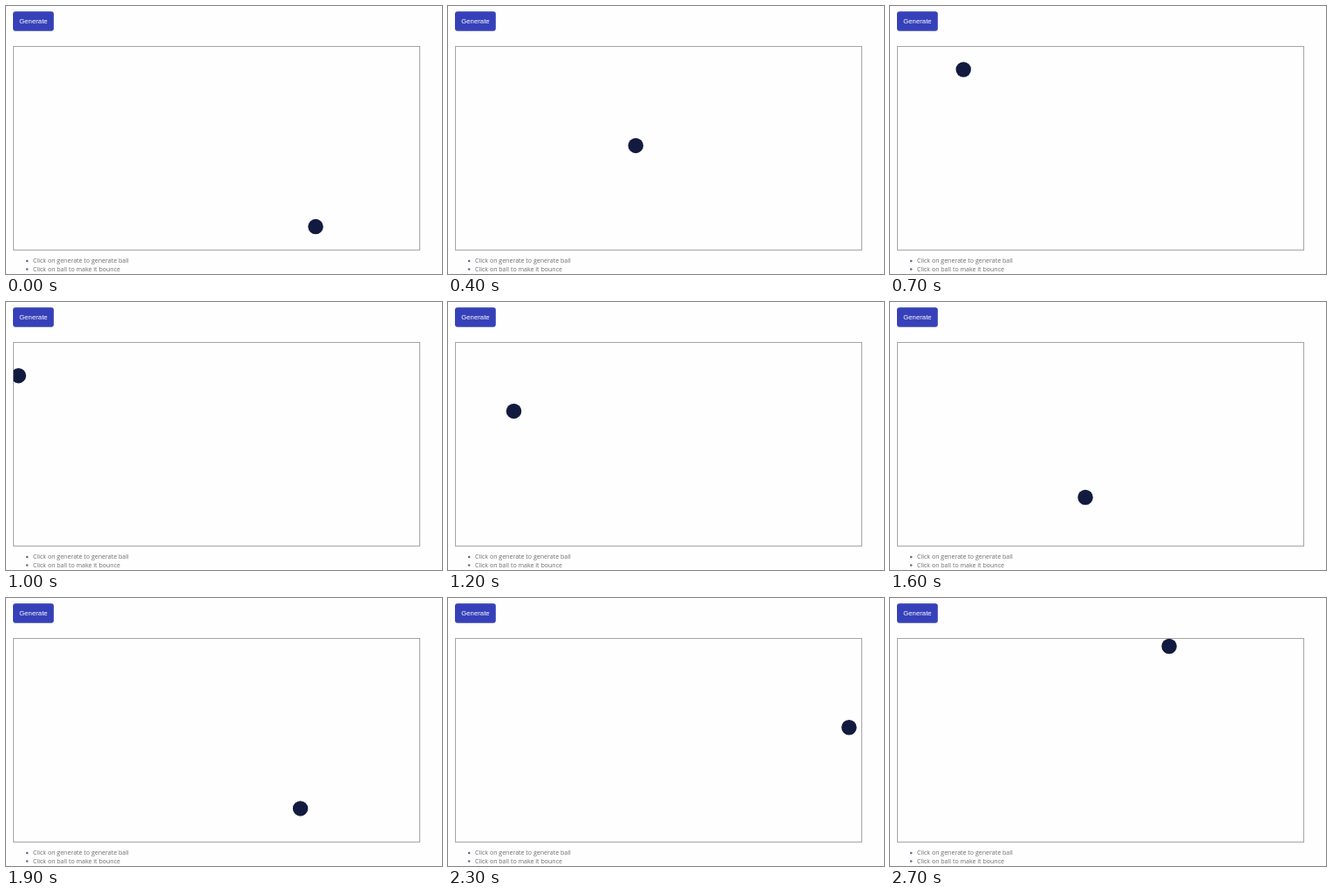
Write an HTML page with a canvas that moves like this. It is 500 px wide and 308 px high and loops after 2800 ms.

```html
<!DOCTYPE html>
<html lang="en">
<head>
<meta charset="utf-8">
<title>Bouncing ball</title>
<style>
  html, body { margin: 0; width: 100%; height: 100%; overflow: hidden; background: #fefefe; }
  canvas { display: block; }
</style>
</head>
<body>
<canvas id="stage" width="500" height="308"></canvas>
<script>
const ctx = document.getElementById("stage").getContext("2d");
const LOOP = 2800, STEP = 100;
const SCALE = 0.5825, LEFT = 8.5, TOP = 46.8;
const FIELD = { x: 8.5, y: 46.5, w: 466, h: 234 };
const BALL = { x: 595, y: 355, dx: 15, dy: 10, r: 15 };

// [step, ball moves made so far]; the ball's pace is slightly uneven
const PACE = [
  [0, 0], [6, 24], [7, 31], [8, 31], [12, 46], [14, 54], [16, 63],
  [19, 76], [20, 79], [23, 92], [26, 103], [27, 108]
];

function movesAt(step) {
  const i = Math.max(1, PACE.findIndex(p => p[0] >= step));
  const [s0, m0] = PACE[i - 1], [s1, m1] = PACE[i];
  return Math.round(m0 + (m1 - m0) * (step - s0) / (s1 - s0));
}

// Reflect a straight path between two walls
function bounce(v, min, max) {
  const span = max - min;
  const p = (((v - min) % (2 * span)) + 2 * span) % (2 * span);
  return min + (p > span ? 2 * span - p : p);
}

function disc(x, y, r, color) {
  ctx.fillStyle = color;
  ctx.beginPath();
  ctx.arc(x, y, r, 0, Math.PI * 2);
  ctx.fill();
}

function label(text, x, y, font, color) {
  ctx.font = font;
  ctx.fillStyle = color;
  ctx.fillText(text, x, y);
}

function drawButton() {
  ctx.fillStyle = "#3641b9";
  ctx.beginPath();
  ctx.roundRect(8, 6.3, 46.8, 22.4, 3);
  ctx.fill();
  label("Generate", 15.2, 20.2, '7.8px "Liberation Sans", Arial, sans-serif', "#fff");
}

function drawHint(text, y) {
  disc(24.2, y - 2.3, 1.3, "#666a85");
  label(text, 31, y, '7.05px "Open Sans", sans-serif', "#6c6c6c");
}

function drawBall(moves) {
  const x = bounce(BALL.x - BALL.dx * moves, 10, 790);
  const y = bounce(BALL.y - BALL.dy * moves, 15, 385);
  ctx.save();
  ctx.beginPath();
  ctx.rect(FIELD.x, FIELD.y, FIELD.w, FIELD.h);
  ctx.clip();
  disc(LEFT + x * SCALE, TOP + y * SCALE, BALL.r * SCALE, "#121b3f");
  ctx.restore();
}

function draw(time) {
  ctx.fillStyle = "#fefefe";
  ctx.fillRect(0, 0, 500, 308);
  drawButton();
  ctx.strokeStyle = "#a6a6a6";
  ctx.lineWidth = 1;
  ctx.strokeRect(FIELD.x, FIELD.y, FIELD.w, FIELD.h);
  drawBall(movesAt(Math.floor(time / STEP)));
  drawHint("Click on generate to generate ball", 295.4);
  drawHint("Click on ball to make it bounce", 304.8);
}

const start = performance.now();
function tick() {
  draw((performance.now() - start) % LOOP);
  requestAnimationFrame(tick);
}
tick();
</script>
</body>
</html>
```
